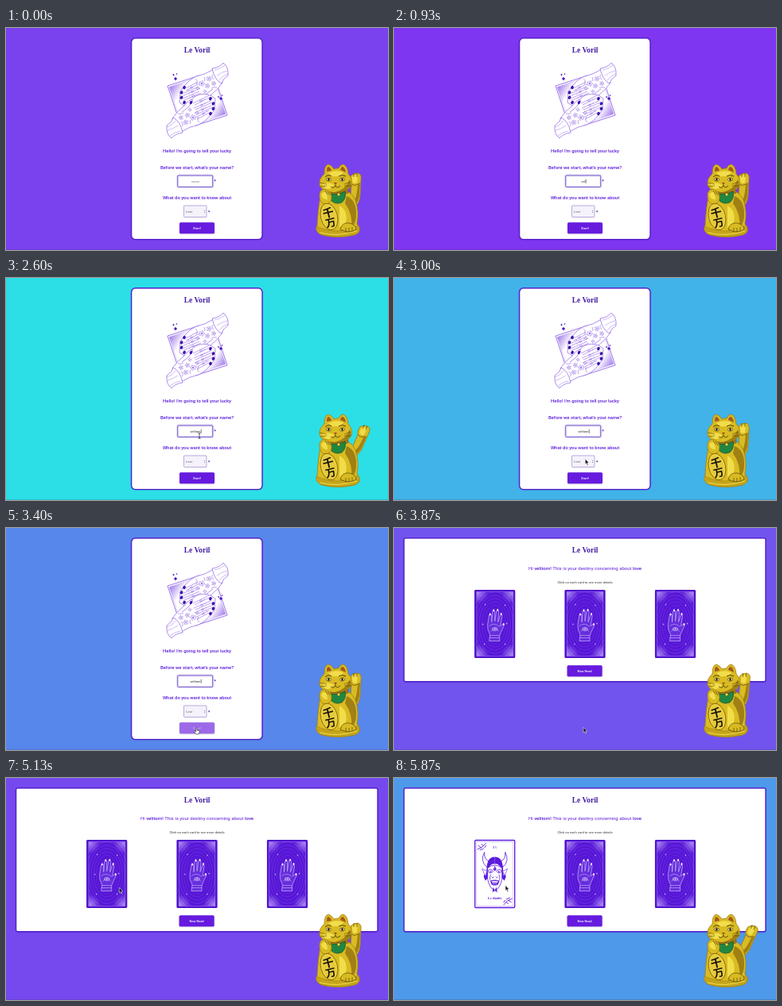
An HTML page with a canvas that plays this animation: 480 by 280 pixels, repeating every 5940 ms.

```html
<!DOCTYPE html>
<html lang="en">
<head>
<meta charset="utf-8">
<title>Le Voril</title>
<style>
html, body { margin: 0; width: 480px; height: 280px; overflow: hidden; background: #7c43ee; }
canvas { display: block; width: 480px; height: 280px; }
</style>
</head>
<body>
<canvas id="stage"></canvas>
<script>
const LOOP = 5940, STEP = 200 / 3;
const NAME = 'velitorn';
const KEYS = [400, 600, 800, 1400, 1900, 2100, 2300, 2480];
const PAGE_AT = 3690, FLIP_AT = 5400;
const SANS = 'Roboto, "Liberation Sans", sans-serif';
const SERIF = '"Liberation Serif", "Noto Serif", serif';
const CJK = '"Noto Sans CJK JP", "Noto Sans CJK SC", "Noto Sans CJK", sans-serif';
const VIOLET = '#5c1bdc', DEEP = '#431ca4';

const canvas = document.getElementById('stage');
const c = canvas.getContext('2d');
const dpr = window.devicePixelRatio || 1;
canvas.width = 480 * dpr;
canvas.height = 280 * dpr;

const clamp = v => Math.max(0, Math.min(1, v));
const ease = v => { v = clamp(v); return v * v * (3 - 2 * v); };
const mix = (a, b, p) => a + (b - a) * p;

function shape(d, fill, line, width = 0.6) {
  const p = new Path2D(d);
  if (fill) { c.fillStyle = fill; c.fill(p); }
  if (line) { c.strokeStyle = line; c.lineWidth = width; c.stroke(p); }
}

function paint(fill, line, width) {
  if (fill) { c.fillStyle = fill; c.fill(); }
  if (line) { c.strokeStyle = line; c.lineWidth = width; c.stroke(); }
}

function box(x, y, w, h, r, fill, line, width = 1) {
  c.beginPath();
  c.roundRect(x, y, w, h, r);
  paint(fill, line, width);
}

function oval(x, y, rx, ry, turn, fill, line, width = 0.6) {
  c.beginPath();
  c.ellipse(x, y, rx, ry, turn, 0, Math.PI * 2);
  paint(fill, line, width);
}

function text(s, x, y, size, color, weight = 400, family = SANS, align = 'center') {
  c.font = `${weight} ${size}px ${family}`;
  c.textAlign = align;
  c.fillStyle = color;
  c.fillText(s, x, y);
  return c.measureText(s).width;
}

function star(x, y, r, fill, line, waist = 0.35) {
  c.beginPath();
  for (let i = 0; i < 8; i++) {
    const a = i * Math.PI / 4, q = i % 2 ? r * waist : r;
    c.lineTo(x + q * Math.sin(a), y - q * Math.cos(a));
  }
  c.closePath();
  paint(fill, line, 0.4);
}

function flower(x, y, r) {
  c.beginPath();
  for (let i = 0; i <= 40; i++) {
    const a = i * Math.PI / 20, q = r * (0.75 + 0.25 * Math.cos(5 * a));
    c.lineTo(x + q * Math.cos(a), y + q * Math.sin(a));
  }
  paint('#fff', '#7440de', 0.45);
  oval(x, y, r * 0.25, r * 0.25, 0, '#7440de');
}

function glow(color, blur, y = 0) {
  c.shadowColor = color;
  c.shadowBlur = blur * dpr;
  c.shadowOffsetY = y * dpr;
}

function background(t) {
  const d = Math.abs(t - 520) % 4030;
  const p = Math.min(d, 4030 - d) / 2015;
  c.fillStyle = `rgb(${mix(150, 40, p)},${mix(9, 230, p)},${231 + 15 * (1 - p) ** 2})`;
  c.fillRect(0, 0, 480, 280);
  c.fillStyle = 'rgba(40,40,80,.18)';
  c.fillRect(0, 279, 480, 1);
}

function panel(x, y, w, h, r) {
  c.save();
  glow('rgba(40,10,120,.4)', 2, 0.4);
  box(x, y, w, h, r, '#fff');
  c.restore();
  box(x, y, w, h, r, null, '#5520cc', 1.4);
  text('Le Voril', 240, 31, 9.4, DEEP, 700, SERIF);
}

function button(x, y, label, hover) {
  c.save();
  glow('rgba(60,20,140,.4)', 1.5, 0.5);
  box(x, y, 44, 14, 1.5, hover ? '#9c69e8' : '#661bdf');
  c.restore();
  text(label, x + 22, y + 8.6, 4, hover ? '#c9b0f2' : '#fff', 500);
}

function tarotCard() {
  const g = c.createLinearGradient(204, 74, 219, 83);
  g.addColorStop(0, '#9a70e8');
  g.addColorStop(1, '#fff');
  shape('M203 73L243 60L254 96L215 109Z', '#fff', VIOLET, 0.6);
  shape('M205 74.5L242 62L252 95L216 107Z', g, '#b79bee', 0.4);
}

function drawnHand() {
  const line = '#7a44df';
  shape('M261 52Q250 59 239 61Q230 65 225 72L219 80L218 94L224 98Q233 102 243 97L258 84Q266 78 272 69Z', '#fff', line, 0.6);
  shape('M259 51Q268 50 273 44Q280 49 279 60Q272 64 271 70Q262 66 259 51Z', '#fff', line, 0.6);
  shape('M262 53Q269 52 275 47M265 60Q272 55 278 54M268 66Q272 60 279 58', null, '#9d78e8', 0.5);
  for (let i = 0; i < 4; i++) {
    const y = 75 + i * 6.3, x = 224 - 4 * Math.sin(i * 1.05);
    shape(`M${x} ${y + 2}L${241 + i} ${68 + i * 6}M${x + 2} ${y + 4}L${243 + i} ${70 + i * 6}`, null, line, 0.5);
    oval(x, y, 1.7, 2.2, 0.6, '#3c0fae');
    oval(233 + i, 75 + i * 5.4, 1.6, 0.9, -0.4, null, line, 0.5);
    oval(229 + i, 78 + i * 5, 0.5, 0.5, 0, line);
  }
  flower(246, 70, 3.6);
  flower(255, 64, 3.2);
  flower(253, 73, 3);
  flower(261, 70, 2.8);
  star(241, 76, 2.4, '#fff', line);
  star(250, 80, 2.4, '#fff', line);
  shape('M238 64Q242 67 239 71M249 62Q251 66 249 67M260 59Q257 61 261 65M258 76Q260 74 265 75', null, line, 0.5);
  shape('M260 77Q252 82 249 87Q245 91 247 93Q252 92 258 84', '#fff', line, 0.6);
  oval(248.5, 89, 1.6, 2.2, 0.5, '#3c0fae');
}

function illustration() {
  for (const part of [tarotCard, drawnHand]) {
    for (const turn of [0, Math.PI]) {
      c.save();
      c.translate(240.5, 91.5);
      c.rotate(turn);
      c.translate(-240.5, -91.5);
      part();
      c.restore();
    }
  }
  [[213, 64, 2.4], [210.5, 59, 1.5], [214.5, 58, 1], [270, 89, 2.4], [267, 87, 1.3], [271.5, 85, 1.1]]
    .forEach(([x, y, r]) => star(x, y, r, '#4a15c0', null, 0.55));
}

function formPage(t) {
  panel(157.6, 12.8, 164.4, 253.8, 5);
  illustration();
  text("Hello! I'm going to tell your lucky", 240, 157, 5.93, VIOLET, 500);
  text("Before we start, what's your name?", 240, 177.7, 5.93, VIOLET, 500);

  c.save();
  glow('rgba(110,80,210,.6)', 2);
  box(215.7, 186, 44, 14.5, 0.8, '#fff', '#7a5ccb', 0.9);
  c.restore();
  const n = KEYS.filter(k => t >= k).length;
  if (n) {
    const w = text(NAME.slice(0, n), 238, 194.8, 4, '#222');
    box(238.3 + w / 2, 190.8, 0.6, 5, 0, '#222');
  } else {
    text('name', 238, 194.8, 4, '#777');
  }
  text('*', 262.7, 195.3, 6, DEEP, 700);

  text('What do you want to know about', 240, 216, 5.93, VIOLET, 500);
  box(223.5, 224, 28.5, 14.5, 0.8, '#f5f2fb', '#a795d4', 0.8);
  text('Love', 226, 233.2, 4, '#666', 400, SANS, 'left');
  shape('M248.9 230.8L249.6 229.8L250.3 230.8ZM248.9 232L249.6 233L250.3 232Z', '#555');
  text('*', 255, 233.5, 6, DEEP, 700);
  button(218, 245.3, 'Start!', t >= 3130);
}

function cardBack(x) {
  c.save();
  c.translate(x, 78.5);
  box(0, 0, 50, 85, 1, '#5716d6', '#4a0fc4', 1.2);
  c.beginPath();
  c.rect(2, 2, 46, 81);
  c.clip();
  for (let i = 0; i < 9; i++) oval(25, 43, 10 + i * 3.2, 20 + i * 4.2, 0, null, `rgba(165,130,255,${0.2 + i * 0.05})`, 0.6);
  for (const px of [2, 48]) for (const py of [2, 83]) {
    const g = c.createRadialGradient(px, py, 0, px, py, 15);
    g.addColorStop(0, 'rgba(210,190,255,.75)');
    g.addColorStop(1, 'rgba(210,190,255,0)');
    c.fillStyle = g;
    c.fillRect(0, 0, 50, 85);
  }
  box(2, 2, 46, 81, 0, null, '#b398f5', 0.7);
  const pale = '#d9cafd';
  shape('M18 64L19 56Q15 49 16 43L18 31Q20 28 21 32L21 40L22 27Q24 23 25 27L25 39L27 26Q29 23 30 28L29 40L32 31Q34 29 34 33L32 45L35 43Q38 42 35 48Q32 54 31 57L31 64Z', 'rgba(120,70,230,.5)', pale, 0.6);
  shape('M18 60L31 60M19 57L31 57M18 45Q24 40 31 46M20 52Q25 45 30 52', null, pale, 0.5);
  oval(25, 49, 3.2, 2, 0, null, '#fff', 0.6);
  oval(25, 49, 0.8, 0.8, 0, '#fff');
  [[19, 30.5], [23.5, 25.5], [28.6, 25], [33, 30], [36, 43]].forEach(([a, b]) => oval(a, b, 0.9, 1.4, 0, '#fff'));
  [[13, 18], [38, 19], [10, 43], [40, 42], [12, 68], [38, 68]].forEach(([a, b]) => star(a, b, 1.4, pale));
  c.restore();
}

function mirrored(d, fill, line, width) {
  for (const s of [1, -1]) {
    c.save();
    c.scale(s, 1);
    shape(d, fill, line, width);
    c.restore();
  }
}

function cardFront(x) {
  c.save();
  c.translate(x, 78.5);
  box(0, 0, 50, 85, 1, '#fff', VIOLET, 1.3);
  box(2, 2, 46, 81, 0.5, null, '#a884ec', 0.4);
  text('XV', 25, 10.5, 4, VIOLET, 400, SERIF);
  for (const turn of [0, Math.PI]) {
    c.save();
    c.translate(25, 42.5);
    c.rotate(turn);
    shape('M-22 -31Q-15 -33 -11 -39M-21 -36L-17 -33M-17 -38L-14 -35M-19 -30L-14 -32M-13 -33L-11 -36', null, VIOLET, 0.9);
    c.restore();
  }
  c.save();
  c.translate(25, 42);
  mirrored('M6 -15Q14 -17 13 -27Q19 -16 10 -8Z', '#fff', VIOLET, 0.8);
  mirrored('M0 -21Q9 -21 10 -9L11 3Q13 -2 14 4L12 9L9 6L8 -7Q4 -13 0 -12Z', VIOLET);
  shape('M-9 -7Q0 -14 9 -7L9 7Q7 18 0 22Q-7 18 -9 7Z', '#fff', VIOLET, 0.8);
  mirrored('M2 -3Q5 -7 8 -4L7 -1Q4 0 2 -3M1 4Q3 7 4 4M5 1Q7 4 6 8', null, VIOLET, 0.8);
  mirrored('M0 -10L2 -5L0 -3Z', VIOLET);
  mirrored('M10 -3L16 -6L12 3Z', '#fff', VIOLET, 0.6);
  oval(-5, -2.7, 1, 0.9, 0, VIOLET);
  oval(5, -2.7, 1, 0.9, 0, VIOLET);
  shape('M-6 9Q0 7 6 9L4 14Q0 16 -4 14Z', VIOLET);
  shape('M-4 9.7H4L3 11.3H-3ZM-3 13H3', '#fff', '#fff', 0.5);
  mirrored('M2 17L3 24L0 21Z', VIOLET);
  c.restore();
  text('Le diable', 25, 74, 4.4, VIOLET, 700, SERIF);
  c.restore();
}

function readingPage(t) {
  panel(12.6, 12.8, 454.4, 181, 2);
  const parts = [['Hi ', 400], [NAME + '!', 500], [' This is your destiny concerning about ', 400], ['love', 500]];
  let total = 0;
  for (const [s, w] of parts) {
    c.font = `${w} 6px ${SANS}`;
    total += c.measureText(s).width;
  }
  let x = 240 - total / 2;
  for (const [s, w] of parts) x += text(s, x, 52.7, 6, VIOLET, w, SANS, 'left');
  text('Click on each card to see more details', 240, 69.6, 4.1, '#333');
  if (t >= FLIP_AT) cardFront(101.7); else cardBack(101.7);
  cardBack(215);
  cardBack(328.5);
  button(217.6, 173.2, 'New Read');
}

function arrow() {
  shape('M-1 -3.5L-1 3L.5 1.8L1.6 4.4L2.7 3.9L1.6 1.4L3.6 1.3Z', '#111', '#fff', 0.5);
}

function pointer(t) {
  if (t < 2500) return;
  c.save();
  if (t < PAGE_AT) {
    const p = ease((t - 2670) / 600);
    c.translate(mix(243, 240, p), mix(199, 256, p));
    if (p < 0.12) {
      shape('M-1.5 -3.5Q0 -3.5 0 -2.5Q0 -3.5 1.5 -3.5M0 -3V3M-1.5 3.5Q0 3.5 0 2.5Q0 3.5 1.5 3.5', null, '#222', 0.7);
    } else if (p > 0.82) {
      shape('M-1.3 -4Q-.6 -5 0 -4V-1L2.8 -.3Q3.4 0 3 2L2 4H-1.5L-3.5 .8Q-3 -.4 -1.3 1Z', '#fff', '#222', 0.6);
    } else arrow();
  } else {
    const p = ease((t - 4470) / 730);
    c.translate(mix(239, 141, p), mix(255, 139, p));
    arrow();
  }
  c.restore();
}

function cat(t) {
  const gold = '#d9bb22', light = '#f1dd4a', shade = '#a08014', ink = '#46350a';
  const wave = Math.pow(0.5 + 0.5 * Math.cos(2 * Math.PI * (t - 420) / 1090), 8);
  c.save();
  c.lineJoin = 'round';

  // raised arm
  c.save();
  c.translate(437, 220);
  c.rotate(0.36 * wave);
  shape('M-7 3L-4 -7L-3 -22Q-6 -27 -4 -33Q-1 -37 5 -37Q10 -36 9 -29L8 -9Q7 2 1 6Z', gold, shade, 0.8);
  shape('M-2 -33Q2 -36 5 -34L4 -25Q0 -23 -2 -26Z', light);
  shape('M5 -24L8 -25L7 -8Q5 2 0 5L-1 0Q4 -5 5 -24Z', shade);
  shape('M0 -37V-32M4 -37V-32M-3 -23Q1 -20 5 -23', null, ink, 0.6);
  c.restore();

  // body and base
  shape('M396 208Q405 203 420 204Q434 205 439 217Q444 231 441 247L443 251Q447 257 438 261Q417 266 397 261Q388 257 391 249Q392 226 396 208Z', gold, shade, 0.8);
  shape('M428 212Q441 217 440 237Q440 246 434 252Q436 235 426 221Z', shade);
  shape('M419 224Q430 230 427 246L419 252Z', light);
  shape('M390 250Q402 256 417 256Q433 255 443 249Q447 258 438 261Q417 266 397 261Q388 258 390 250Z', '#c5a51c', shade, 0.6);
  shape('M394 258Q416 264 441 256', null, light, 1);
  shape('M420 254Q422 245 431 246Q440 248 440 254Q431 260 420 254Z', gold, ink, 0.6);
  shape('M427 252V257M431 252V257M435 251V256', null, ink, 0.6);

  // head
  shape('M400 184Q400 173 405 172Q409 173 412 178Q415 177 418 177Q420 172 424 172Q429 174 430 184Q436 191 434 198Q431 207 414 208Q397 207 394 198Q393 190 400 184Z', gold, shade, 0.8);
  shape('M403 181Q403 175 405 175Q408 176 409 180Z', '#a4591a');
  shape('M420 179Q421 175 423 175Q426 176 427 182Z', '#a4591a');
  shape('M405 183Q414 178 424 182Q421 188 415 187Q409 188 405 183Z', light);
  shape('M397 197Q405 193 412 198Q409 204 402 203Z', light);
  shape('M432 191Q436 198 430 203Q422 208 413 207Q427 204 432 191Z', shade);
  shape('M401 188Q405 184 409 187M418 187Q422 184 427 187', null, ink, 0.9);
  for (const [x, turn] of [[405.5, 0.15], [422.5, -0.15]]) {
    oval(x, 191, 3, 2, turn, '#fff1a0', ink, 0.7);
    oval(x, 191, 1.2, 1.8, 0, '#1d1604');
  }
  shape('M412 195H416L414 197Z', '#8e3517');
  shape('M414 197V199M408 200Q412 203 414 199Q416 203 420 199', null, ink, 0.8);
  shape('M403 197L394 195M403 199L395 200M425 197L433 194M425 199L434 199', null, ink, 0.5);

  // collar, bib and lowered paw
  shape('M404 206Q417 210 430 204L430 208Q417 213 404 210Z', '#a97a18', '#6e4a0e', 0.5);
  shape('M407 209Q418 211 426 206Q428 215 422 220Q414 223 409 218Z', '#208742', '#12502a', 0.7);
  oval(418, 210, 1.9, 1.9, 0, light, ink, 0.5);
  shape('M394 209Q396 202 403 204Q409 207 409 214Q409 221 401 222Q393 221 394 209Z', gold, shade, 0.8);
  shape('M396 210Q399 205 403 208L404 216Q398 217 396 210Z', light);
  shape('M404 206L407 211M401 205L404 210', null, ink, 0.6);

  // coin
  c.translate(406, 238);
  c.rotate(-0.24);
  oval(0, 0, 10.5, 17, 0, '#e5ca3c', '#8b6c10', 0.9);
  oval(0, 0, 9, 15.2, 0, null, light, 0.6);
  text('千', 0, 0, 14, '#17130a', 900, CJK);
  text('万', 0, 12.5, 13, '#17130a', 900, CJK);
  c.restore();
}

function draw(now) {
  const t = Math.floor((now % LOOP + 4) / STEP) * STEP;
  c.setTransform(dpr, 0, 0, dpr, 0, 0);
  background(t);
  if (t < PAGE_AT) formPage(t); else readingPage(t);
  pointer(t);
  cat(t);
}

const start = performance.now();
function tick() {
  draw(performance.now() - start);
  requestAnimationFrame(tick);
}
tick();
</script>
</body>
</html>
```
